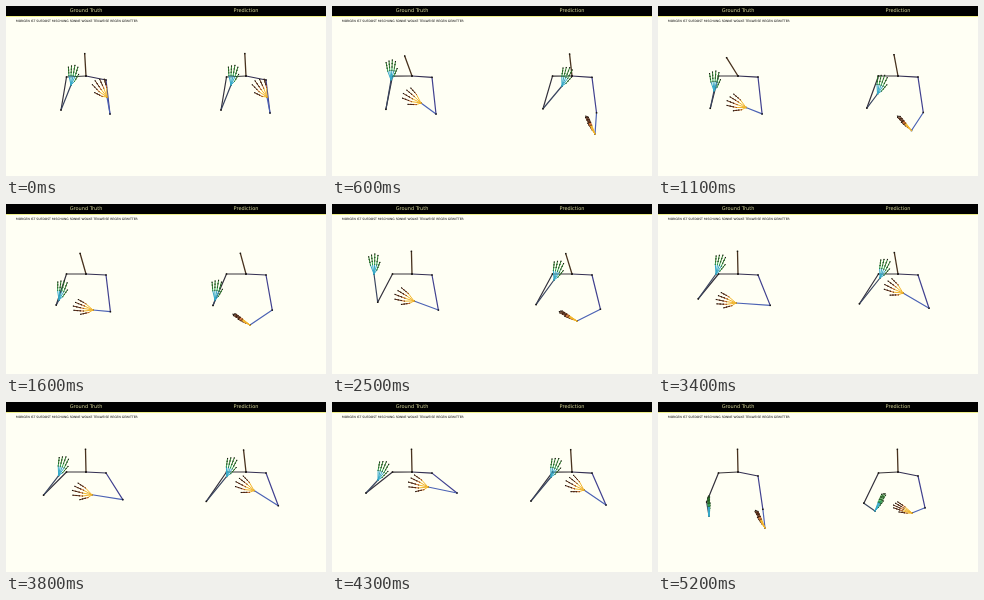
Recreate the animation shown at these times as an HTML page with a canvas. Size 320x170 px, loop 5300 ms.

```html
<!DOCTYPE html>
<html lang="de">
<head>
<meta charset="utf-8">
<title>Sign poses</title>
<style>
html, body { margin: 0; width: 100%; height: 100%; overflow: hidden; background: #fffff4; }
canvas { display: block; }
</style>
</head>
<body>
<canvas id="stage" width="320" height="170"></canvas>
<script>
const ctx = document.getElementById('stage').getContext('2d');
const LOOP = 5300, STEP = 100;
const KEY_TIMES = [0, 600, 1600, 2500, 3400, 4300, 5200];
const NECK = [80, 70], HAND_LENGTH = 20;

// Elbows swing outwards by formula; wrists pass through a few key points.
const FIGURES = [
  {
    offset: 0, nod: { at: 1050, width: 650, size: 11 },
    left: {
      elbow: [55, 104], swing: [-21, -13], ease: 1.5,
      wrist: [[65, 79], [59, 74], [53, 96], [42, 70], [58, 70], [46, 78], [51, 114]]
    },
    right: {
      elbow: [104, 108], swing: [21, -17], ease: 4,
      wrist: [[101, 91], [89, 97], [87, 106], [82, 97], [78, 99], [96, 85], [107, 126]]
    }
  },
  {
    offset: 160, nod: { at: 2200, width: 1500, size: 6 },
    left: {
      elbow: [55, 104], swing: [-16, -5], ease: .7,
      wrist: [[65, 79], [70, 80], [49, 96], [62, 76], [62, 74], [59, 75], [57, 109]]
    },
    right: {
      elbow: [104, 107], swing: [10, -4], ease: 1.5,
      wrist: [[101, 91], [103, 128], [84, 121], [85, 117], [85, 89], [92, 88], [94, 111]]
    }
  }
];

const LEFT = {
  side: 1, bias: [-.2, -.6], spread: .17,
  arm: ['#39353a', '#34313c', '#3b4660'],
  hand: ['#35a9c8', '#31a653', '#2d7a2e']
};
const RIGHT = {
  side: -1, bias: [-.6, -.4], spread: .24,
  arm: ['#332f52', '#41418f', '#4b62b4'],
  hand: ['#f2b52c', '#c9692b', '#5a2a14']
};

const clamp = (v, low, high) => Math.min(high, Math.max(low, v));

function pointAt(keys, time) {
  let i = 0;
  while (i < KEY_TIMES.length - 2 && time > KEY_TIMES[i + 1]) i++;
  const p = (time - KEY_TIMES[i]) / (KEY_TIMES[i + 1] - KEY_TIMES[i]);
  return keys[i].map((v, k) => v + (keys[i + 1][k] - v) * p);
}

function line(a, b, color, width) {
  ctx.strokeStyle = color;
  ctx.lineWidth = width;
  ctx.beginPath();
  ctx.moveTo(...a);
  ctx.lineTo(...b);
  ctx.stroke();
}

function joint([x, y], size) {
  ctx.fillStyle = '#1c1812';
  ctx.fillRect(x - size / 2, y - size / 2, size, size);
}

// The hand continues the forearm, always tipped upwards and inwards,
// and is seen edge-on when the forearm hangs down.
function drawHand(elbow, wrist, look) {
  const { side, bias, hand } = look;
  const dx = wrist[0] - elbow[0], dy = wrist[1] - elbow[1], reach = Math.hypot(dx, dy) || 1;
  const angle = Math.atan2(bias[1] - Math.abs(dy) / reach, bias[0] + side * Math.abs(dx) / reach);
  const spread = side * look.spread * clamp((16 - dy) / 20, .2, 1);
  const polar = (turn, r) => [
    wrist[0] + Math.cos(angle + turn) * r * HAND_LENGTH,
    wrist[1] + Math.sin(angle + turn) * r * HAND_LENGTH
  ];
  for (let k = 0; k < 5; k++) {
    const turn = spread * (k ? 2.5 - k : 3);
    const tip = k ? 1 - .05 * Math.abs(k - 2) : .65;
    const knuckle = polar(turn * 1.3, k ? .48 : .25), end = polar(turn, tip);
    line(wrist, knuckle, hand[0], 1);
    joint(knuckle, 1);
    let from = knuckle;
    for (let s = 1; s <= 3; s++) {
      const to = knuckle.map((v, i) => v + (end[i] - v) * s / 3);
      line(from, to, hand[Math.min(s, 2)], 1);
      joint(to, 1.1);
      from = to;
    }
  }
}

function drawSide(shoulder, { elbow, swing, ease, wrist }, look, time, outward) {
  const bend = elbow.map((v, i) => v + swing[i] * outward ** ease);
  const points = [NECK, shoulder, bend, pointAt(wrist, time)];
  look.arm.forEach((color, i) => line(points[i], points[i + 1], color, 1.2));
  points.forEach(p => joint(p, 1.5));
  drawHand(points[2], points[3], look);
}

function drawFigure({ offset, nod, left, right }, time) {
  const tilt = nod.size * Math.exp(-(((time - nod.at) / nod.width) ** 2));
  const head = [79.5 - tilt, 47.3 + tilt * .4];
  const droop = (2 * time / 5200 - 1) ** 8;
  const outward = time < 4300 ? time / 4300 : 1 - .55 * (time - 4300) / 900;
  ctx.save();
  ctx.translate(offset, 0);
  line(NECK, head, '#49331f', 1.3);
  joint(head, 1.4);
  drawSide([60.5, 70 + droop], left, LEFT, time, outward);
  drawSide([100, 71 + 3 * droop], right, RIGHT, time, outward);
  ctx.restore();
}

function label(text, x, y, size, color, align) {
  ctx.font = `${size}px "DejaVu Sans", sans-serif`;
  ctx.fillStyle = color;
  ctx.textAlign = align;
  ctx.fillText(text, x, y);
}

function band(y, height, color) {
  ctx.fillStyle = color;
  ctx.fillRect(0, y, 320, height);
}

function draw(now) {
  const time = Math.floor(now % LOOP / STEP) * STEP;
  band(0, 170, '#fffff4');
  band(0, 10, '#000');
  band(10, 1, '#eeee88');
  label('Ground Truth', 80, 5.8, 5, '#d8d89a', 'center');
  label('Prediction', 240, 5.8, 5, '#d8d89a', 'center');
  label('MORGEN IST SUEDOST MISCHUNG SONNE WOLKE TEILWEISE REGEN GEWITTER', 10, 16.2, 3.05, '#000', 'left');
  FIGURES.forEach(figure => drawFigure(figure, time));
}

const start = performance.now();
function tick() {
  draw(performance.now() - start);
  requestAnimationFrame(tick);
}
ctx.lineCap = 'round';
tick();
</script>
</body>
</html>
```
